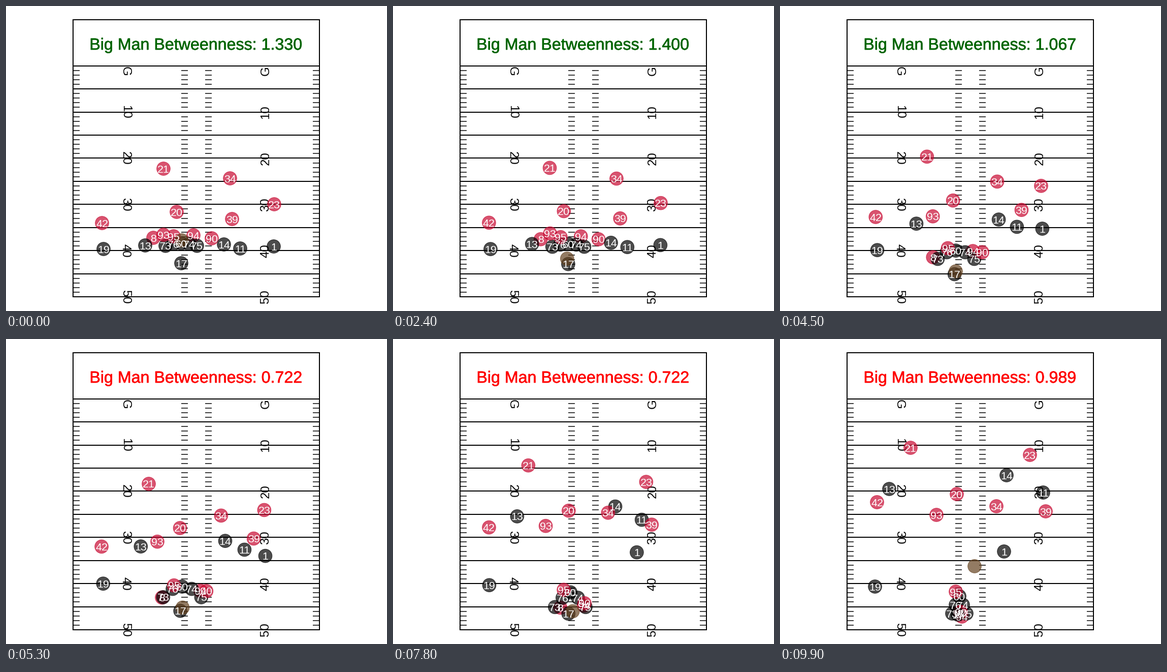
Write a matplotlib script that moves like this. It is 750x600 px and loops after 10000 ms.

```python
import matplotlib.pyplot as plt
import numpy as np
from matplotlib import patheffects
from matplotlib.animation import FuncAnimation
from matplotlib.patches import Circle

W, H, DPI = 750, 600, 100
FRAMES, INTERVAL = 100, 100
PT = 72 / DPI  # points per pixel

LEFT, RIGHT, TOP, GOAL, BOTTOM = 132, 617, 27, 117.7, 572
YARD = (BOTTOM - GOAL) / 50

RED, BLACK, BROWN = "#c80a32", "black", "#654321"
FONT = "Liberation Sans"
RADIUS, LABEL = 13.3, 21.5

SNAP, BREAK, END = 18, 60, FRAMES - 1
# share of (x, y) travel done at the break: receivers cut late, defenders early
PACE = {BLACK: (0.2, 0.45), RED: (0.65, 0.42)}

fig = plt.figure(figsize=(W / DPI, H / DPI), dpi=DPI, facecolor="white")
ax = fig.add_axes([0, 0, 1, 1])
ax.set_xlim(0, W)
ax.set_ylim(H, 0)
ax.axis("off")


def line(x0, y0, x1, y1, width=2, cap="projecting"):
    ax.plot([x0, x1], [y0, y1], color="black", lw=width * PT,
            solid_capstyle=cap, zorder=1)


def write(x, y, s, px, color="black", **kw):
    return ax.text(x, y, s, fontsize=px * PT, family=FONT, color=color,
                   ha="center", **kw)


def draw_field():
    for x in (LEFT, RIGHT):
        line(x, TOP, x, BOTTOM)
    line(LEFT, TOP, RIGHT, TOP)
    for yard in range(51):
        y = GOAL + yard * YARD
        if yard % 5 == 0:
            line(LEFT, y, RIGHT, y)
        else:
            for x in (LEFT, 345, 392, RIGHT - 13):
                line(x, y, x + 13, y, 1.5, "butt")
        if yard % 10 == 0:
            for x, turn in ((234.7, -90), (511.5, 90)):
                write(x, y if yard else 128, str(yard or "G"), 24,
                      rotation=turn, va="center", zorder=1.5)


def glide(a, b, c):
    """Rest at a until the snap, pass b at the break, reach c at the end."""
    h0, h1 = BREAK - SNAP, END - BREAK
    d0, d1 = (b - a) / h0, (c - b) / h1
    m = 2 * d0 * d1 / (d0 + d1) if d0 * d1 > 0 else 0

    def leg(s, p, q, h, v0, v1):
        return (p + (q - p) * s * s * (3 - 2 * s)
                + h * s * (1 - s) * (v0 * (1 - s) - v1 * s))

    f = np.arange(FRAMES)
    s0 = np.clip((f - SNAP) / h0, 0, 1)
    s1 = np.clip((f - BREAK) / h1, 0, 1)
    return np.where(f < BREAK, leg(s0, a, b, h0, 0, m), leg(s1, b, c, h1, m, d1))


movers = []


def token(color, xs, ys, label=None):
    dot = Circle((xs[0], ys[0]), RADIUS, facecolor=color, edgecolor=color,
                 alpha=0.7, lw=PT, zorder=2)
    ax.add_patch(dot)
    text = label and write(0, 0, label, LABEL, "white", va="baseline", zorder=3)
    movers.append((dot, text, xs, ys))


def player(number, color, start, end, via=None):
    if via is None:
        via = [a + (b - a) * p for a, b, p in zip(start, end, PACE[color])]
    xs, ys = (glide(*v) for v in zip(start, via, end))
    token(color, xs, ys, str(number))


def blocker(number, slot):
    # the line backs up, spreads, then folds in around the passer
    out = abs(slot)
    player(number, BLACK,
           start=(345 + 15.5 * slot, 467 + 1.2 * out ** 2),
           via=(347 + 19 * slot, 491 + 6 * out ** 2),
           end=(353 + 7 * slot, 506 + 17 * out))


draw_field()

player(94, RED, (369, 451), (358, 546), via=(384, 505))
player(8, RED, (290, 456), (354, 539), via=(312, 517))
for number, slot in ((60, 0), (75, 2), (76, -1), (73, -2), (74, 1)):
    blocker(number, slot)
player(90, RED, (405, 457), (356, 537), via=(391, 504))
player(95, RED, (330, 453), (346, 497), via=(331, 489))

player(1, BLACK, (527, 473), (441, 418), via=(505, 422))
player(11, BLACK, (461, 477), (518, 302))
player(14, BLACK, (429, 469), (446, 268))
player(19, BLACK, (192, 478), (187, 487))
player(17, BLACK, (345, 506), (350, 542), via=(343, 538))
player(13, BLACK, (274, 471), (215, 295))

player(23, RED, (528, 390), (492, 228))
player(93, RED, (310, 450), (308, 346), via=(297, 388))
player(20, RED, (336, 405), (348, 305))
player(39, RED, (445, 419), (523, 339))
player(34, RED, (441, 339), (426, 329), via=(422, 348))
player(42, RED, (189, 427), (191, 321), via=(188, 402))
player(21, RED, (310, 320), (257, 214))

# the ball: snap, hold, throw
ball = [(0, 346, 461), (20, 346, 461), (25, 342, 506), (60, 349, 534),
        (94, 358, 537), (END, 383, 447)]
when, bx, by = zip(*ball)
token(BROWN, *(np.interp(np.arange(FRAMES), when, v) for v in (bx, by)))

# frame at which each score appears
SCORES = {0: 1.33, 20: 1.4, 30: 1.33, 35: 0.989, 43: 1.067, 46: 0.722,
          60: 0.626, 74: 0.722, 91: 0.989}

title = write(373.3, 86, "", 32.2, va="baseline", zorder=3)


def update(i):
    score = SCORES[max(k for k in SCORES if k <= i)]
    color = "darkgreen" if score >= 1 else "red"
    title.set_text(f"Big Man Betweenness: {score:.3f}")
    title.set_color(color)
    title.set_path_effects([patheffects.withStroke(linewidth=0.6 * PT,
                                                   foreground=color)])
    for dot, text, xs, ys in movers:
        dot.center = xs[i], ys[i]
        if text:
            text.set_position((xs[i], ys[i] + 0.35 * LABEL))
    return []


anim = FuncAnimation(fig, update, frames=FRAMES, interval=INTERVAL,
                     repeat=True, repeat_delay=0, blit=False)
plt.show()
```
